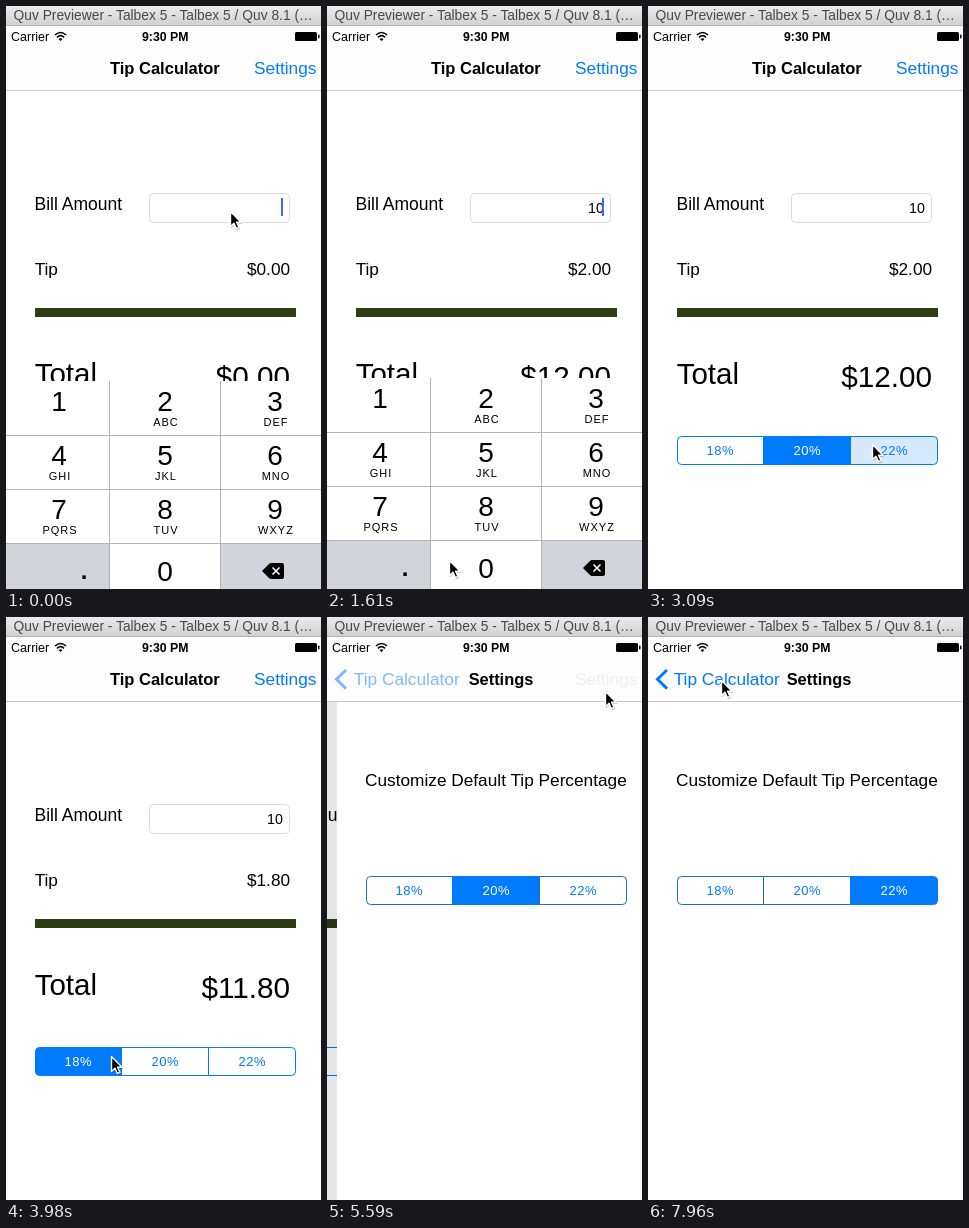
An HTML page that plays this animation: 315x583 px, repeating every 8 s.

```html
<!DOCTYPE html>
<html lang="en">
<head>
<meta charset="utf-8">
<title>Tip Calculator</title>
<style>
html, body { margin: 0; width: 100%; height: 100%; overflow: hidden; background: #fff; }
svg { display: block; width: 100%; height: 100%; font-family: "Liberation Sans", Arial, sans-serif; }
</style>
</head>
<body>
<svg id="stage" viewBox="0 0 315 583"></svg>
<script>
const LOOP = 8000, STEP = 147.2, BLUE = '#007aff', RULE = '#b4b4b8';
const stage = document.getElementById('stage');

// Pointer waypoints: step, x, y
const PATH = [
  [0, 224, 205], [4, 55, 400], [5, 55, 402], [8, 125, 556], [11, 122, 554],
  [14, 150, 325], [16, 150, 325], [20, 224, 438], [23, 224, 438], [26, 105, 439],
  [27, 105, 439], [29, 150, 440], [30, 150, 440], [32, 240, 132], [35, 278, 74],
  [39, 278, 74], [40, 272, 118], [43, 235, 270], [46, 235, 272], [47, 255, 278],
  [50, 255, 278], [54, 73, 63]
];
const RATES = [18, 20, 22];
const KEYS = ['', 'ABC', 'DEF', 'GHI', 'JKL', 'MNO', 'PQRS', 'TUV', 'WXYZ'];
const COLUMNS = [103.5, 214.5], CENTERS = [53, 159, 269];

const clamp = v => Math.max(0, Math.min(1, v));
const smooth = v => v * v * (3 - 2 * v);
const money = v => '$' + v.toFixed(2);

const text = (x, y, size, content, attrs = '') =>
  `<text x="${x}" y="${y}" font-size="${size}" ${attrs}>${content}</text>`;
const rect = (x, y, w, h, fill, attrs = '') =>
  `<rect x="${x}" y="${y}" width="${w}" height="${h}" fill="${fill}" ${attrs}/>`;
const path = (d, attrs) => `<path d="${d}" ${attrs}/>`;
const group = (x, y, content) => `<g transform="translate(${x} ${y})">${content}</g>`;
const END = 'text-anchor="end"', MID = 'text-anchor="middle"', BOLD = 'font-weight="bold"';
const INK = `fill="${BLUE}"`;

function pointerAt(k) {
  const i = PATH.findIndex(p => p[0] >= k);
  if (i < 1) return PATH[i < 0 ? PATH.length - 1 : 0].slice(1);
  const [k0, x0, y0] = PATH[i - 1], [k1, x1, y1] = PATH[i];
  const e = smooth((k - k0) / (k1 - k0));
  return [x0 + (x1 - x0) * e, y0 + (y1 - y0) * e].map(Math.round);
}

function segments(y, selected, pressed, line = BLUE) {
  const edges = [0, 86, 173, 260];
  const shape = i => {
    const a = edges[i], b = edges[i + 1];
    if (i === 0) return `M${b} 0H4Q0 0 0 4V24Q0 28 4 28H${b}Z`;
    if (i === 2) return `M${a} 0H256Q260 0 260 4V24Q260 28 256 28H${a}Z`;
    return `M${a} 0H${b}V28H${a}Z`;
  };
  const parts = RATES.map((rate, i) => {
    const fill = rate === selected ? BLUE : rate === pressed ? '#d7e9fd' : '#fff';
    return path(shape(i), `fill="${fill}" stroke="${rate === selected ? BLUE : line}"`) +
      text(42.7 + 87 * i, 18.5, 13, rate + '%',
        `${MID} letter-spacing=".5" fill="${rate === selected ? '#fff' : BLUE}"`);
  });
  return group(29.5, y, parts.join(''));
}

function calculator(k) {
  const amount = k < 5 ? '' : k < 10 ? '1' : '10';
  const rate = k < 22 ? 20 : k < 27 ? 22 : k < 30 ? 18 : 20;
  const pressed = k === 21 ? 22 : k === 26 ? 18 : k === 29 ? 20 : 0;
  const tip = amount * rate / 100;
  const caret = k < 15 && k !== 3 && k !== 4;
  return text(28.5, 203.5, 17.5, 'Bill Amount') +
    rect(143.5, 187.5, 140, 29, '#fff', 'rx="4" stroke="#dcdcdc"') +
    text(277, 207, 14.3, amount, END) +
    (caret ? rect(275, 192, 2, 18, '#4169e1') : '') +
    text(28.7, 268.5, 17.2, 'Tip') +
    text(284, 268.5, 17.2, money(tip), END) +
    rect(29, 302, 261, 9, '#2f3d15') +
    text(28.7, 377.5, 29.5, 'Total') +
    text(284, 380.5, 29.7, money(+amount + tip), END) +
    segments(430.5, rate, pressed);
}

function settings(k) {
  return rect(0, 84, 315, 499, '#fff') +
    text(28, 168.5, 17.25, 'Customize Default Tip Percentage') +
    segments(259.5, k < 45 ? 20 : 22, k === 44 ? 22 : 0, '#1f70c4');
}

function keyboard(k) {
  if (k > 17) return '';
  const shift = k === 0 ? 3 : Math.round(211 * smooth(clamp((k - 14) / 4)));
  const gray = '#d1d4da';
  let out = rect(0, 0, 315, 215, '#fff');
  KEYS.forEach((letters, i) => {
    const col = i % 3, y = 54 * Math.floor(i / 3);
    if (i === 0 && k === 4) out += rect(0, 0, 103, 54, gray);
    out += text(CENTERS[col], y + 30, 28, i + 1, MID) +
      text(CENTERS[col] + 1, y + 45, 11, letters, `${MID} letter-spacing="1"`);
  });
  out += rect(0, 162, 103, 52, gray) + rect(215, 162, 100, 52, gray);
  if (k === 9) out += rect(104, 162, 110, 52, gray);
  out += path(`M0 54.5H315M0 108.5H315M0 162.5H315M${COLUMNS[0]} 0V214M${COLUMNS[1]} 0V214`,
    `stroke="${RULE}" fill="none"`);
  out += text(78, 198, 24, '.', `${MID} ${BOLD}`) + text(159, 200, 28, 0, MID) +
    path('M256 190L263 183Q264 182 265 182H276Q278 182 278 184V196Q278 198 276 198H265Q264 198 263 197Z', '') +
    path('M266.5 186.5L273.5 193.5M273.5 186.5L266.5 193.5', 'stroke="#fff" stroke-width="1.6"');
  return group(0, 372 + shift, out);
}

function navigation(k, u, p) {
  let out = rect(0, 20, 315, 64, '#fdfdfd') + rect(0, 84, 315, 1, '#cacaca');
  if (u < 1) {
    const fade = k < 36 ? 1 : 0.2 * (1 - u);
    out += text(104 - 78 * p, 68, 16.5, 'Tip Calculator', `${BOLD} opacity="${clamp(1 - 2 * u)}"`) +
      text(248, 68, 17.3, 'Settings', `fill="${u > 0 ? '#777' : BLUE}" opacity="${fade}"`);
  }
  if (u > 0) {
    out += path('M19 53L9.5 62.3L19 71.6', `fill="none" stroke="${BLUE}" stroke-width="3" opacity="${u}"`) +
      text(25.7 + 34 * (1 - p), 68, 17.3, 'Tip Calculator', `${INK} opacity="${u}"`) +
      text(138.7 + 94 * (1 - p), 68, 16.4, 'Settings', `${BOLD} opacity="${clamp(2 * u)}"`);
  }
  return out;
}

function statusBar() {
  return `<defs><linearGradient id="chrome" x2="0" y2="1"><stop stop-color="#ebebeb"/><stop offset="1" stop-color="#d0d0d0"/></linearGradient></defs>` +
    rect(0, 0, 315, 20, 'url(#chrome)') + rect(0, 19, 315, 1, '#b5b5b5') +
    text(7.5, 14, 13.8, 'Quv Previewer - Talbex 5 - Talbex 5 / Quv 8.1 (…', 'fill="#4a4a4a"') +
    text(5, 35, 12.5, 'Carrier') +
    path('M49 29Q54.5 24 60 29M51 31.3Q54.5 28 58 31.3', 'fill="none" stroke="#000" stroke-width="1.6"') +
    path('M52.5 33Q54.5 31.3 56.5 33L54.5 35Z', '') +
    text(136, 35, 12.3, '9:30 PM', BOLD) +
    rect(289, 26, 22, 9, '#000', 'rx="1.5"') + rect(312, 28.5, 1.5, 4, '#000', 'rx=".7"');
}

const pointer = k => group(...pointerAt(k),
  path('M1 2V17L4.5 13.8L7 19L9.8 17.8L7.4 12.6H12Z', 'opacity=".2" stroke="#000" stroke-width="1"') +
  path('M.5 .5V15.5L4 12.2L6.4 17.5L9 16.4L6.6 11.2H11Z',
    'stroke="#fff" stroke-width="1.4" stroke-linejoin="round"'));

function render(k) {
  const u = clamp((k - 36) / 4), p = 1 - (1 - u) ** 5;
  let out = rect(0, 0, 315, 583, '#fff');
  if (u < 1) {
    out += group(Math.round(-94 * p), 0, calculator(k)) + keyboard(k);
    if (u > 0) out += rect(0, 84, 315, 499, '#000', `opacity="${0.1 * p}"`);
  }
  if (u > 0) out += group(Math.round(315 * (1 - p)), 0, settings(k));
  stage.innerHTML = out + navigation(k, u, p) + statusBar() + pointer(k);
}

let shown = -1;
function tick() {
  const k = Math.floor((performance.now() % LOOP + 10) / STEP);
  if (k !== shown) render(shown = k);
  requestAnimationFrame(tick);
}
tick();
</script>
</body>
</html>
```
